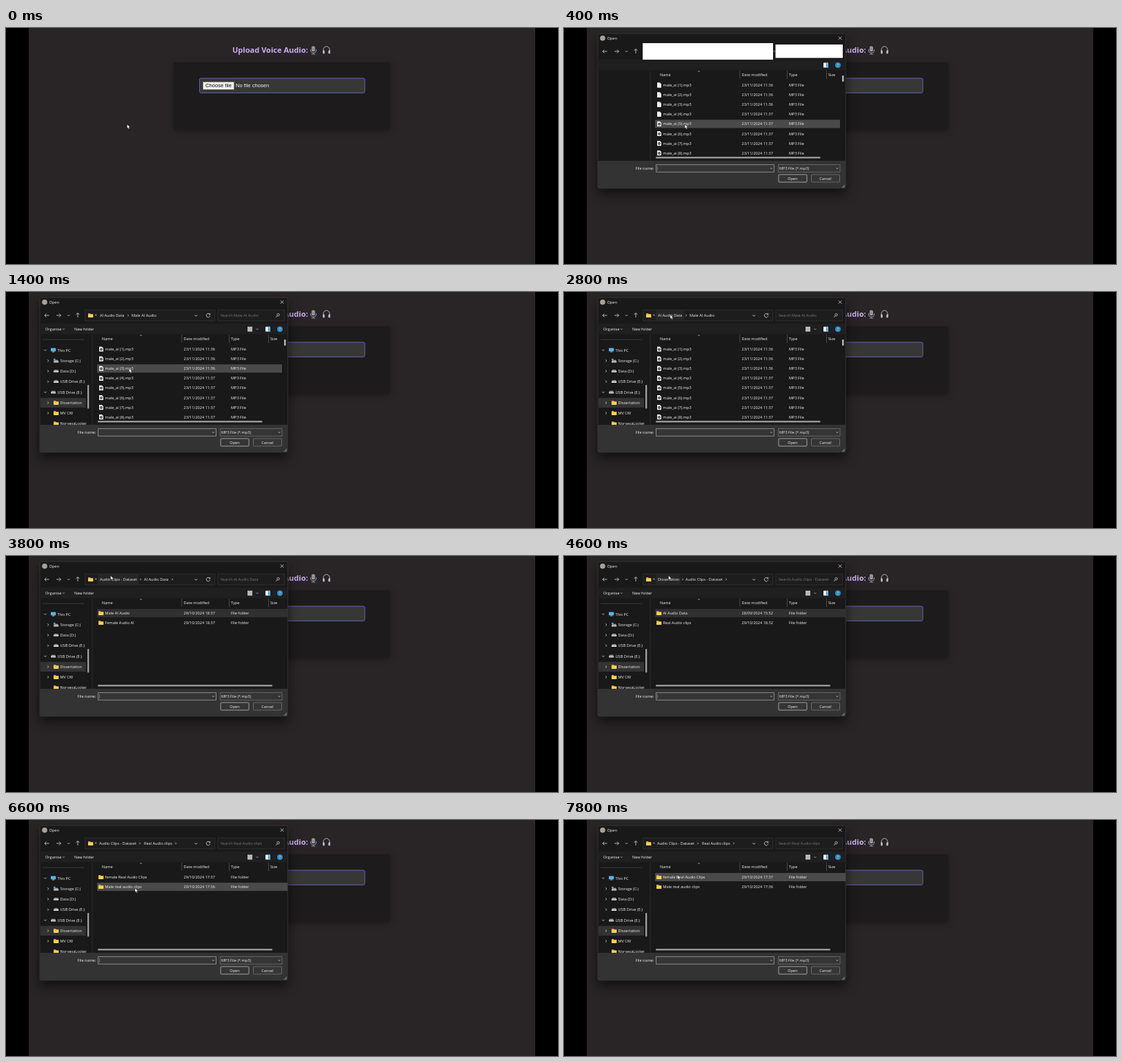
An HTML page that plays this animation: 800x343 px, repeating every 8 s.

```html
<!DOCTYPE html>
<html lang="en">
<head>
<meta charset="utf-8">
<title>Upload voice audio</title>
<style>
  html, body { margin: 0; width: 100%; height: 100%; overflow: hidden; background: #000; }
  svg { display: block; width: 100%; height: 100%; }
  text { font: 5.6px "Open Sans", "Noto Sans", sans-serif; fill: #f4f4f4; white-space: pre; }
  .title { font-size: 11.07px; font-weight: 700; fill: #cfaaf8; }
  .form { font: 7.6px "Liberation Sans", Arial, sans-serif; }
  .dim { fill: #7c7c7c; }
  .line { fill: none; stroke: #d8d8d8; stroke-width: .8; }
</style>
</head>
<body>
<svg id="stage" viewBox="0 0 800 343" preserveAspectRatio="none"></svg>
<script>
const LOOP = 8000, STEP = 200, ROW = 14.1, FIRST_ROW = 83;

const rect = (x, y, w, h, fill, extra = '') =>
  `<rect x="${x}" y="${y}" width="${w}" height="${h}" fill="${fill}" ${extra}/>`;
const label = (x, y, s, cls = '', extra = '') =>
  `<text x="${x}" y="${y + 2}" class="${cls}" ${extra}>${s}</text>`;
const line = (d, extra = '') => `<path class="line" d="${d}" ${extra}/>`;
const group = (id, body, extra = '') => `<g id="${id}" ${extra}>${body}</g>`;
const chevron = (x, y, turn = 0, r = 1.7) =>
  line(`M${-r} ${-r / 2}L0 ${r / 2}L${r} ${-r / 2}`, `transform="translate(${x} ${y}) rotate(${turn})"`);
const folder = (x, y) =>
  `<path d="M${x} ${y - 3}h2.8l1 1h3.4v5h-7.2z" fill="#e2a52c"/>` + rect(x, y - 1.2, 7.2, 4.2, '#fbd05c', 'rx=".5"');
const drive = (x, y) =>
  `<path d="M${x + 1.2} ${y - 2}h4.8l1.2 1.8h-7.2z" fill="#a5a5a5"/>` + rect(x, y - .2, 7.2, 1.9, '#d4d4d4', 'rx=".4"');
const page = (x, y, music) =>
  `<path d="M${x} ${y - 3.6}h4l2 2v5.2h-6z" fill="#f2f2f2"/>` +
  (music ? `<circle cx="${x + 3}" cy="${y + .3}" r="1.9" fill="#333"/><circle cx="${x + 3}" cy="${y + .3}" r=".7" fill="#eee"/>`
         : line(`M${x + 4} ${y - 3.6}v2h2`, 'style="stroke:#aaa;stroke-width:.5"'));

// Folder views: crumbs are [x, width, text]; rows are [name, date].
const CLIPS = 'Audio Clips - Dataset';
const views = {
  audio: {
    crumbs: [[136, 36, 'AI Audio Data'], [182, 37, 'Male AI Audio']],
    files: true,
    rows: Array.from({ length: 8 }, (_, i) => [`male_ai (${i + 1}).mp3`, `23/11/2024 11:3${i < 3 ? 6 : 7}`])
  },
  ai: {
    crumbs: [[136, 54, CLIPS], [200, 36, 'AI Audio Data']], focus: true,
    rows: [['Male AI Audio', '29/10/2024 18:37'], ['Female Audio AI', '29/10/2024 18:37']]
  },
  clips: {
    crumbs: [[136, 31, 'Dissertation'], [176, 54, CLIPS]], focus: true,
    rows: [['AI Audio Data', '28/09/2024 15:52'], ['Real Audio clips', '29/10/2024 18:32']]
  },
  real: {
    crumbs: [[135, 54, CLIPS], [200, 41, 'Real Audio clips']],
    rows: [['female Real Audio Clips', '29/10/2024 17:37'], ['Male real audio clips', '29/10/2024 17:36']]
  }
};

const timeline = [
  { at: 200, view: 'audio', loading: true },
  { at: 800, view: 'audio' },
  { at: 3400, view: 'ai' },
  { at: 4600, view: 'clips' },
  { at: 6200, view: 'real' }
];

// Pointer tip: time, x, y.
const pointer = [
  [0, 175.5, 140], [600, 175, 140], [1100, 175, 140], [1400, 178.5, 111], [2200, 178, 110],
  [2800, 154, 33], [3500, 154, 33], [3800, 151.5, 28.5], [4700, 151.5, 28.5],
  [5600, 187, 99], [6600, 187, 99], [7600, 164.5, 80], [8000, 164.5, 80]
];

function pageMarkup() {
  const mic = rect(442.8, 26.5, 5.2, 7.6, '#aaa3b2', 'rx="2.4"') +
    line('M443 29h5M443 31h5', 'style="stroke:#6d6576"') +
    line('M441.5 31v1.8a4 3.3 0 0 0 8 0v-1.8M445.5 36v1.6M442.7 38h5.6', 'style="stroke:#958d9e;stroke-width:1.1"');
  const phones = line('M460 34v-2.5a4.5 4.7 0 0 1 9 0v2.5', 'style="stroke:#b9b1c4;stroke-width:1"') +
    rect(459.2, 32.4, 2.5, 5, '#cbc3d6', 'rx="1.1"') + rect(467.3, 32.4, 2.5, 5, '#cbc3d6', 'rx="1.1"');
  return rect(0, 0, 800, 343, '#000') + rect(33, 0, 734, 343, '#292526') +
    label(328, 34.2, 'Upload Voice Audio:', 'title') + mic + phones +
    rect(243, 50, 314, 98, '#1d1b1c', 'rx="2" filter="url(#cardShadow)"') +
    rect(280.5, 73, 239.5, 21.3, '#383737', 'rx="2" stroke="#6064ae"') +
    rect(285.5, 78.3, 45, 11, '#efefef', 'stroke="#777" stroke-width=".6"') +
    label(289, 84.2, 'Choose file', 'form', 'style="fill:#111"') +
    label(333, 84.2, 'No file chosen', 'form');
}

function sidebarMarkup() {
  const items = [
    [74.5, 84.5, 'This PC', 'pc'], [78.5, 100, 'Storage (C:)', 'system'], [78.5, 115, 'Data (D:)', 'drive'],
    [78.5, 130.3, 'USB Drive (E:)', 'drive'], [74.5, 145.7, 'USB Drive (E:)', 'drive'],
    [78.5, 161, 'Dissertation', 'folder'], [78.5, 176, 'MV CW', 'folder'], [78.5, 191.2, 'NorvexaLocker', 'folder']
  ];
  const icons = {
    folder, drive,
    system: (x, y) => drive(x, y + .8) + rect(x, y - 3.2, 2.6, 2.6, '#3aa0e8'),
    pc: (x, y) => rect(x, y - 3, 7.2, 4.8, '#58b5e8', 'rx=".5"') + rect(x + 2, y + 2, 3.2, 1, '#bbb')
  };
  return rect(50, 154, 66, 14, '#333') + line('M53 69.2h60', 'style="stroke:#444"') +
    items.map(([x, y, name, kind]) => {
      const open = x < 78;
      const arrow = y < 190 ? chevron(open ? 57 : 61, y, open ? 0 : -90) : '';
      return arrow + icons[kind](x - 9.5, y) + label(x, y, name);
    }).join('');
}

function dialogMarkup() {
  const nav = line('M62.5 34h-6.5m2.5-2.5l-2.5 2.5l2.5 2.5M73 34h6.5m-2.5-2.5l2.5 2.5l-2.5 2.5M104 37v-6.5m-2.5 2.5l2.5-2.5l2.5 2.5') +
    chevron(90.5, 34);
  const header = label(139, 68, 'Name') + label(257.5, 68, 'Date modified') + label(326, 68, 'Type') + label(383, 68, 'Size') +
    chevron(195.5, 63, 180, 1.3) + line('M254.7 62v12M323.5 62v12M380.5 62v12', 'style="stroke:#555"');
  const footer = `<path d="M49 193H408.3V230.5a2.5 2.5 0 0 1-2.5 2.5H51.5a2.5 2.5 0 0 1-2.5-2.5z" fill="#333"/>` +
    label(130.5, 204, 'File name:', '', 'text-anchor="end"') +
    rect(133.5, 198.7, 171, 10.6, '#353535', 'stroke="#a0a0a0" stroke-width=".8"') + chevron(300.5, 204, 0, 1.4) +
    rect(310.5, 198.7, 89.5, 10.6, '#353535', 'stroke="#777" stroke-width=".7"') + label(312, 204, 'MP3 File (*.mp3)') + chevron(396, 204, 0, 1.4) +
    rect(311, 213, 41, 11, '#353535', 'rx="1" stroke="#bbb" stroke-width=".8"') + label(331.5, 218.5, 'Open', '', 'text-anchor="middle"') +
    rect(358.5, 213, 41, 11, '#353535', 'rx="1" stroke="#777" stroke-width=".8"') + label(379, 218.5, 'Cancel', '', 'text-anchor="middle"') +
    line('M403 232l4-4M405 232l2-2', 'style="stroke:#aaa"');
  return rect(49, 8, 359.3, 225, '#191919', 'rx="2.5" stroke="#454545" stroke-width=".6" filter="url(#dialogShadow)"') +
    rect(49.3, 46, 358.7, 15.5, '#1f1f1f') +
    '<circle cx="56" cy="14.8" r="3.8" fill="#aaa296"/>' + label(62.5, 15, 'Open') +
    line('M397.8 12.3l4.6 4.6m0-4.6l-4.6 4.6') + nav +
    rect(376, 50.5, 7, 7, '#eee', 'rx=".6"') + rect(380, 51.2, 2.5, 5.6, '#37a5e6') +
    '<circle cx="397" cy="54" r="4" fill="#2d8fcb"/>' + label(397, 54.2, '?', '', 'text-anchor="middle"') +
    line('M125 62v131', 'style="stroke:#303030"') + header + footer;
}

const loadedMarkup = () =>
  rect(114.8, 26, 187.5, 16, '#1d1d1d', 'stroke="#383838" stroke-width=".7"') +
  rect(307, 26, 96.5, 16, '#1d1d1d', 'stroke="#383838" stroke-width=".7"') +
  rect(0, 27, 0, 14, '#262626', 'id="crumbHover"') +
  folder(119, 34) + label(129, 33.2, '«') + chevron(275.3, 34.3, 0, 2) +
  line('M295.2 32.2a2.8 2.8 0 1 0 .7 2.4M295.8 30.8v2h-2') +
  '<circle cx="394.5" cy="33.2" r="1.7" class="line"/>' + line('M393.3 34.5l-2.2 2.3') +
  label(57, 54, 'Organise') + chevron(83.3, 54, 0, 1.2) + label(99, 54, 'New folder') +
  rect(350, 50.6, 7, 6.8, '#ddd') + line('M350 52.4h7M350 54.1h7M350 55.8h7', 'style="stroke:#555;stroke-width:.5"') +
  chevron(364, 54, 0, 1.2) +
  group('sidebar', sidebarMarkup(), 'clip-path="url(#sideClip)"') +
  rect(118, 135, 2.3, 34.5, '#a0a0a0', 'rx="1"');

const loadingMarkup = () => rect(114, 22, 189, 24, '#fff') + rect(306.5, 24, 97.5, 19.5, '#fff') +
  rect(303.8, 33.5, 2, 1, '#999');

function viewMarkup({ crumbs, files, rows }) {
  const bar = crumbs.map(([x, w, name], i) =>
    label(x, 34, name) + (i && files ? '' : chevron(x + w + 5, 34, -90, 1.3))).join('');
  const list = rows.map(([name, date], i) => {
    const y = FIRST_ROW + ROW * i;
    return (files ? page(135, y, true) : folder(134, y)) + label(143.5, y, name) +
      label(257.5, y, date) + label(326, y, files ? 'MP3 File' : 'File folder');
  }).join('');
  const thumb = rect(133, 187.3, files ? 238.5 : 253, 2.2, '#a3a3a3', 'rx="1"');
  return `<g class="bar">${bar}${label(311, 34, 'Search ' + crumbs[1][2], 'dim', 'clip-path="url(#searchClip)"')}</g>` +
    list + thumb + (files ? rect(403, 69, 2.6, 9, '#b0b0b0', 'rx="1"') : '');
}

const shadow = (id, drop, size, opacity) =>
  `<filter id="${id}" x="-20%" y="-30%" width="140%" height="160%" color-interpolation-filters="sRGB">` +
  `<feDropShadow dx="0" dy="${drop}" stdDeviation="${size}" flood-opacity="${opacity}"/></filter>`;
const clip = (id, x, y, w, h) => `<clipPath id="${id}">${rect(x, y, w, h, '#000')}</clipPath>`;
const plainPages = [0, 1, 2, 3].map(i => page(135, FIRST_ROW + ROW * i, false)).join('');

document.getElementById('stage').innerHTML =
  `<defs>${shadow('cardShadow', 2, 4, .35)}${shadow('dialogShadow', 8, 8, .6)}` +
  `${clip('sideClip', 50, 62, 66.5, 131)}${clip('searchClip', 308, 27, 78, 14)}</defs>` +
  pageMarkup() +
  group('dialog', dialogMarkup() + group('loaded', loadedMarkup()) + group('loading', loadingMarkup()) +
    rect(132, 77, 276, 12, '#303030', 'id="focusRow"') + rect(132, 77, 268, 12, '#4a4a4a', 'id="hoverRow"') +
    Object.keys(views).map(key => group('view-' + key, viewMarkup(views[key]))).join('') +
    group('plainPages', plainPages) + rect(135, 201, .5, 6, '#bbb', 'id="caret"')) +
  group('pointer', '<path d="M0 0v6l1.4-1.2l1 2.1l1.1-.5l-1-2h1.9z" fill="#fff" stroke="#111" stroke-width=".4"/>');

const el = id => document.getElementById(id);
const show = (id, on) => { el(id).style.display = on ? '' : 'none'; };
const set = (id, attrs) => { for (const k in attrs) el(id).setAttribute(k, attrs[k]); };

function pointerAt(t) {
  const next = pointer.findIndex(p => p[0] > t);
  const [t0, x0, y0] = pointer[next - 1], [t1, x1, y1] = pointer[next];
  const u = (t - t0) / (t1 - t0), k = u * u * (3 - 2 * u);
  return [x0 + (x1 - x0) * k, y0 + (y1 - y0) * k];
}

function render(t) {
  const [x, y] = pointerAt(t);
  set('pointer', { transform: `translate(${x} ${y})` });
  const scene = timeline.filter(s => s.at <= t).pop();
  show('dialog', scene);
  if (!scene) return;

  const view = views[scene.view], loading = !!scene.loading;
  show('loaded', !loading);
  show('loading', loading);
  show('plainPages', loading);
  for (const key in views) show('view-' + key, key === scene.view);
  el('view-audio').querySelector('.bar').style.display = loading ? 'none' : '';

  const row = Math.round((y - FIRST_ROW) / ROW);
  show('hoverRow', y > 76 && x > 132 && row < view.rows.length);
  set('hoverRow', { y: FIRST_ROW + ROW * row - 6, width: view.files ? 268 : 276 });
  show('focusRow', view.focus);

  const crumb = view.crumbs.find(([cx, w]) => x >= cx - 3 && x <= cx + w + 2);
  show('crumbHover', crumb && y > 26 && y < 42);
  if (crumb) set('crumbHover', { x: crumb[0] - 3, width: crumb[1] + 5 });
  show('caret', (t - scene.at) % 1060 < 530);
}

const start = performance.now();
function tick() {
  const t = (performance.now() - start) % LOOP;
  render(Math.floor(t / STEP) * STEP);
  requestAnimationFrame(tick);
}
tick();
</script>
</body>
</html>
```
